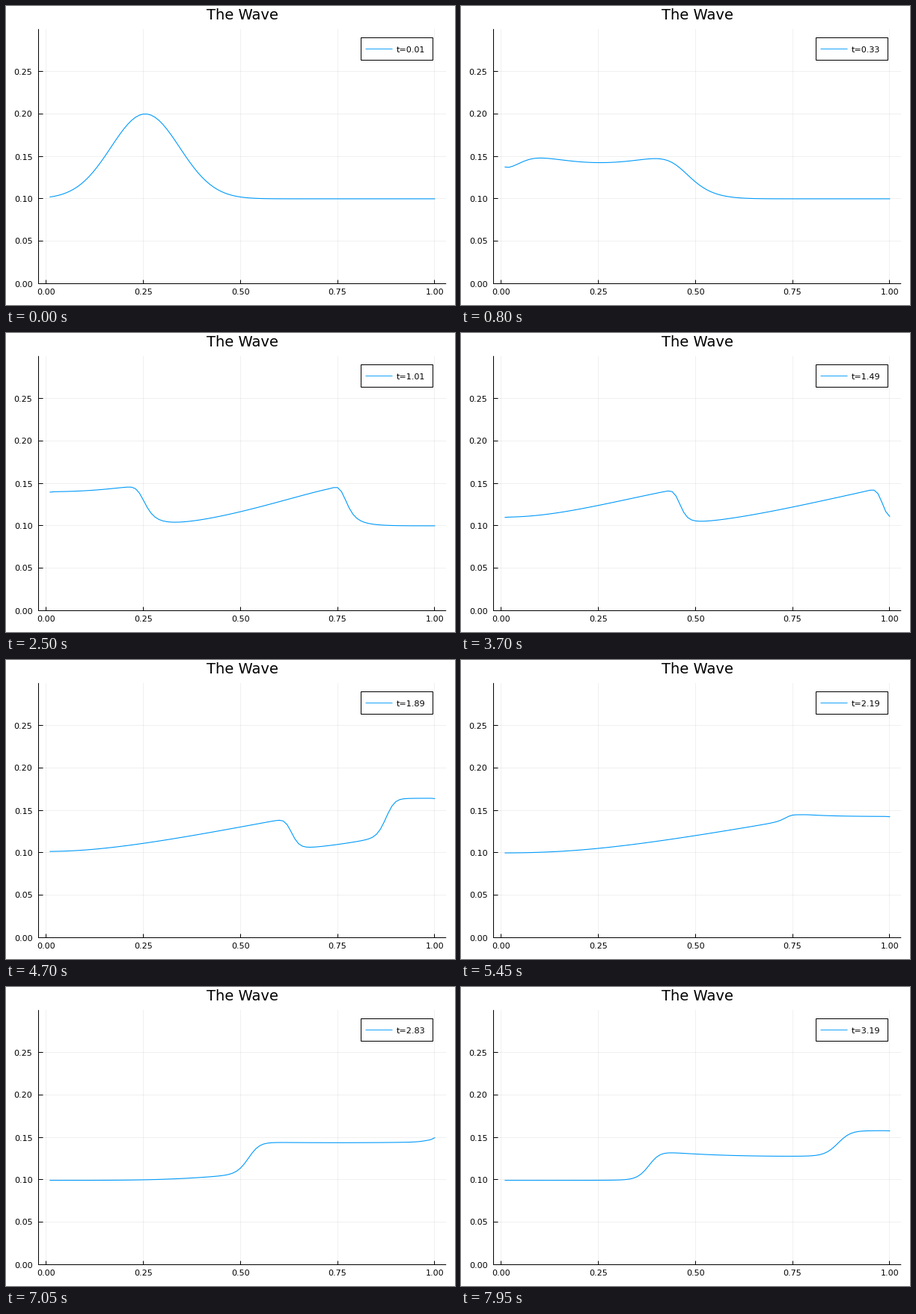
These frames come from a looping animation (600 by 400 pixels, 8 s). A matplotlib script:

```python
import math

import numpy as np
import matplotlib.pyplot as plt
from matplotlib.animation import FuncAnimation
from matplotlib.patches import Rectangle

plt.rcParams["font.family"] = "DejaVu Sans"

W, H, DPI = 600, 400, 100
FRAMES, INTERVAL = 160, 50
G, CELLS, DX, DT = 1.0, 100, 0.01, 0.02
LEFT, RIGHT, TOP, BOTTOM = 43.5, 588.2, 30.8, 371.5
BLUE = "#009AFA"


def flux(h, q):
    return np.array([q, q * q / h + G * h * h / 2])


def wall(h, q, side):
    """No mass passes a wall; the water there is slowed towards rest."""
    return 0, G * h * h / 2 + side * q * DX / DT / 2


def step(h, q):
    """One Lax-Friedrichs step of the shallow water equations."""
    state, f = np.array([h, q]), flux(h, q)
    faces = np.empty((2, CELLS + 1))
    faces[:, 1:-1] = ((f[:, :-1] + f[:, 1:]) / 2
                      - DX / DT / 2 * np.diff(state, axis=1))
    faces[:, 0] = wall(h[0], q[0], -1)
    faces[:, -1] = wall(h[-1], q[-1], 1)
    return state - DT / DX * np.diff(faces, axis=1)


def simulate():
    centres = (np.arange(CELLS) + 0.5) * DX
    h = 0.1 + 0.1 * np.exp(-64 * (centres - 0.25) ** 2)
    q = np.zeros(CELLS)
    heights = []
    for _ in range(FRAMES):
        heights.append(h)
        h, q = step(h, q)
    return heights


def px(x):
    return LEFT + (x + 0.0197) / 1.0494 * (RIGHT - LEFT)


def py(h):
    return BOTTOM - h / 0.3 * (BOTTOM - TOP)


def crisp(v):
    return math.floor(v) + 0.5


fig = plt.figure(figsize=(W / DPI, H / DPI), dpi=DPI, facecolor="white")
ax = fig.add_axes([0, 0, 1, 1])
ax.set_xlim(0, W)
ax.set_ylim(H, 0)
ax.axis("off")


def line(x0, y0, x1, y1, **style):
    style = {"color": "black", "lw": 0.72, "solid_capstyle": "butt",
             "snap": False, **style}
    ax.plot([x0, x1], [y0, y1], **style)


grid = {"alpha": 0.06, "zorder": 1}
for tick in np.arange(5) * 0.25:
    x = crisp(px(tick))
    line(x, TOP, x, BOTTOM, **grid)
    line(x, BOTTOM, x, BOTTOM - 5, zorder=3)
    ax.text(px(tick), 386.4, f"{tick:.2f}", size=8, ha="center", va="baseline")
for tick in np.arange(6) * 0.05:
    y = crisp(py(tick))
    line(LEFT, y, RIGHT, y, **grid)
    line(LEFT, y, LEFT + 6, y, zorder=3)
    ax.text(35.4, y + 4, f"{tick:.2f}", size=8, ha="right", va="baseline")

line(LEFT, TOP, LEFT, BOTTOM + 0.5, zorder=3)
line(LEFT, BOTTOM, RIGHT, BOTTOM, zorder=3)
ax.text(316, 18, "The Wave", size=14, ha="center", va="baseline")

# Legend
ax.add_patch(Rectangle((474.5, 42.5), 96, 30, fc="white", ec="black",
                       lw=0.72, snap=False, zorder=5))
line(480.5, 57.5, 516.5, 57.5, color=BLUE, lw=0.65, zorder=6)
label = ax.text(521.6, 61.7, "", size=8, va="baseline", zorder=6)

heights = simulate()
xs = px(np.arange(1, CELLS + 1) * DX)
curve, = ax.plot(xs, py(heights[0]), color=BLUE, lw=0.8, zorder=4)


def update(i):
    curve.set_ydata(py(heights[i]))
    label.set_text(f"t={0.01 + 0.02 * i:.2f}")
    return curve, label


anim = FuncAnimation(fig, update, frames=FRAMES, interval=INTERVAL,
                     init_func=lambda: update(0), repeat=True, repeat_delay=0)
plt.show()
```
